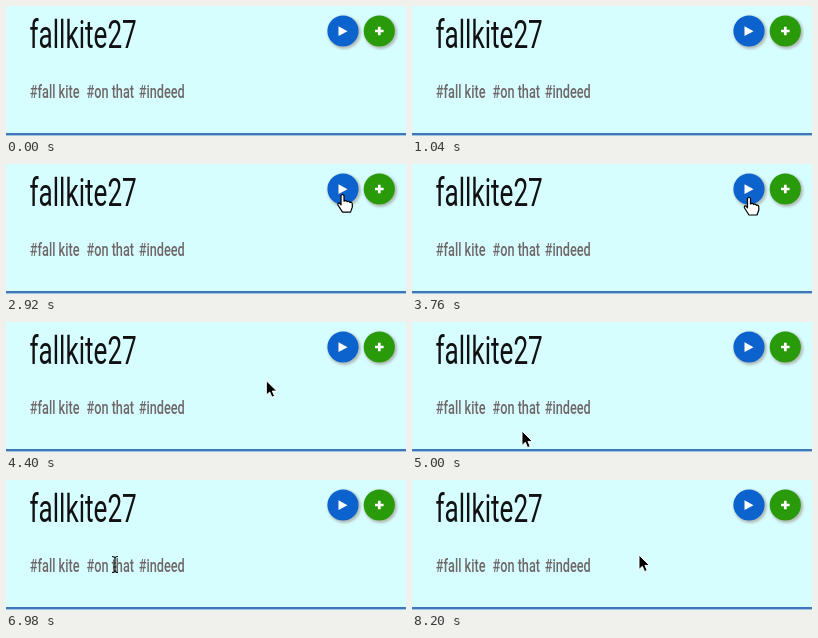
These frames come from a looping animation (400x130 px, 8.22 s). An HTML page:

```html
<!DOCTYPE html>
<html lang="en">
<head>
<meta charset="utf-8">
<title>Profile card</title>
<style>
  html, body { margin: 0; width: 100%; height: 100%; overflow: hidden; background: #d6fdff; }
  svg { display: block; width: 400px; height: 130px; }
  text { font-family: Roboto, "Open Sans", sans-serif; cursor: default; }
  .tag { font-size: 19px; font-weight: 500; fill: #706868; }
</style>
</head>
<body>
<svg viewBox="0 0 400 130">
  <defs>
    <filter id="soft" x="-30%" y="-30%" width="160%" height="160%">
      <feGaussianBlur stdDeviation="1"/>
    </filter>
    <g id="disc"><circle r="15.6"/></g>
  </defs>
  <rect width="400" height="130" fill="#d6fdff"/>
  <rect y="127" width="400" height="2.4" fill="#4276b8"/>

  <!-- one narrow face for all text -->
  <g transform="scale(.67 1)">
    <text x="35" y="42" font-size="39" fill="#111">fallkite27</text>
    <text class="tag" x="35.5" y="92.5">#fall kite</text>
    <text class="tag" x="120" y="92.5">#on that</text>
    <text class="tag" x="198" y="92.5">#indeed</text>
  </g>

  <g fill="#b4c0ba" filter="url(#soft)">
    <circle cx="338.3" cy="26.5" r="16.6"/>
    <circle cx="374.6" cy="26.5" r="16.6"/>
  </g>
  <use href="#disc" x="337" y="25" fill="#0c63cd"/>
  <path d="M332.5 20.3L341.5 25.2L332.5 30.1Z" fill="#fff"/>
  <use href="#disc" x="373.3" y="25" fill="#299a0a"/>
  <path d="M369 25h8.6M373.3 20.7v8.6" stroke="#fff" stroke-width="2.7"/>

  <g id="pointer" stroke-linejoin="round">
    <path id="arrow" d="M0 0V15.5L3.6 12.2L6 17.8L8.8 16.6L6.4 11.2H11.2Z"
      transform="scale(.93)" stroke="#fff"/>
    <path id="hand" d="M-1.5 1.5Q0 -1 1.5 1.5V7Q3.5 5.6 4.6 7.5Q6.5 6.4 7.4 8.3Q9.8 7.6 9.8 10.5V13L8 18H0L-4.6 10.8Q-5 8.6 -3 9L-1.5 10.8Z"
      fill="#fff" stroke="#000" stroke-width="1.2"/>
    <path id="beam" d="M-3 -7.5Q0 -7.5 0 -5.5Q0 -7.5 3 -7.5M0 -5.5V6.5M-3 8.5Q0 8.5 0 6.5Q0 8.5 3 8.5M-1.5 3H1.5"
      fill="none" stroke="#111" stroke-width="1.2"/>
  </g>
</svg>
<script>
const LOOP = 8220, MOVE = 900;
// each stop: arrival time and place; a move takes at most MOVE
const stops = [
  { at: 0, x: 215, y: 140 },
  { at: 1900, x: 336.5, y: 30 },
  { at: 3700, x: 337, y: 33 },
  { at: 4950, x: 110, y: 109 },
  { at: 6100, x: 59, y: 85 },
  { at: 6980, x: 109, y: 84 },
  { at: 8100, x: 227, y: 75 }
];
const get = id => document.getElementById(id);
const pointer = get("pointer");
const shapes = ["arrow", "hand", "beam"].map(get);

function place(t) {
  const next = stops.findIndex(s => s.at > t);
  if (next < 0) return stops.at(-1);
  const a = stops[next - 1], b = stops[next];
  const u = Math.max(0, 1 - (b.at - t) / Math.min(MOVE, b.at - a.at));
  const k = u * u * (3 - 2 * u);
  return { x: a.x + (b.x - a.x) * k, y: a.y + (b.y - a.y) * k };
}

function shapeAt(x, y) {
  if (Math.hypot(x - 337, y - 25) < 16) return "hand";
  return x > 23 && x < 180 && y > 72 && y < 99 ? "beam" : "arrow";
}

function draw() {
  const { x, y } = place(performance.now() % LOOP);
  const shown = shapeAt(x, y);
  pointer.setAttribute("transform", `translate(${x} ${y})`);
  for (const s of shapes) s.style.display = s.id === shown ? "" : "none";
  requestAnimationFrame(draw);
}
draw();
</script>
</body>
</html>
```
